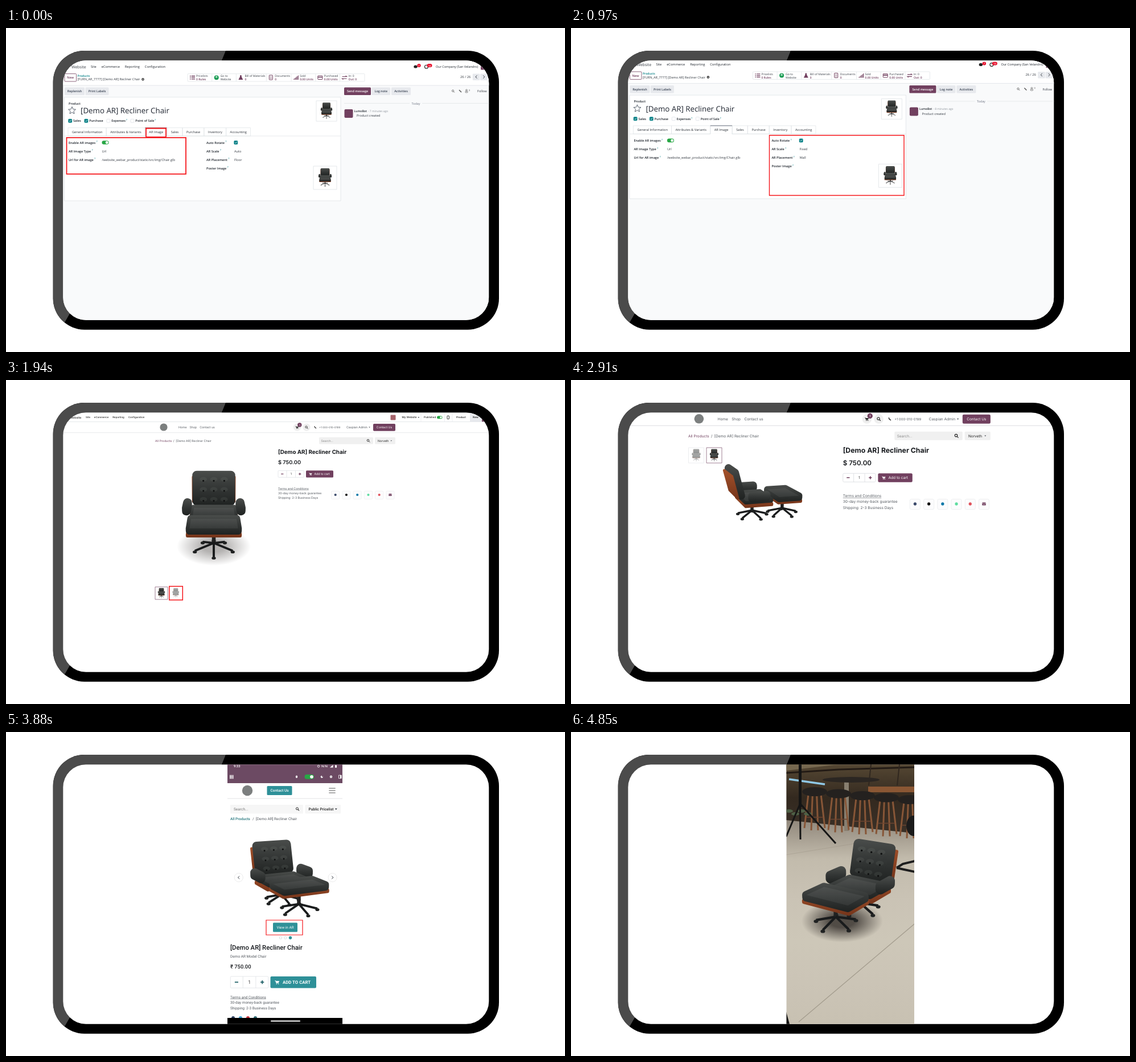
These frames come from a looping animation (982 px wide and 570 px high, 5820 ms). An HTML page with a canvas:

```html
<!DOCTYPE html>
<html lang="en">
<head>
<meta charset="utf-8">
<title>AR product tour</title>
<style>
html, body { margin: 0; width: 982px; height: 570px; overflow: hidden; background: #fff; }
canvas { display: block; }
</style>
</head>
<body>
<canvas id="stage" width="982" height="570"></canvas>
<script>
const g = document.getElementById('stage').getContext('2d');
const SLIDE_MS = 970;
const PLUM = '#71405f', TEAL = '#2e9098', LINK = '#017e84', RED = '#f5161b', INK = '#353b43';
const DARK = '#1f252d', TEXT = '#555a60', GREY = '#e7e9ed', EDGE = '#dfe2e6';
const PRODUCT = '[Demo AR] Recliner Chair';
let face = 'Inter';

// Drawing helpers; say() returns where the text ends
function say(text, x, y, size, color = INK, weight = 400, align = 'left') {
  g.font = `${weight} ${size}px "${face}", sans-serif`;
  g.textRendering = 'geometricPrecision';
  g.textAlign = align;
  g.fillStyle = color;
  g.fillText(text, x, y);
  return x + g.measureText(text).width;
}
function row(words, x, y, gap, ...style) {
  for (const word of words) x = say(word, x, y, ...style) + gap;
}
function box(x, y, w, h, fill, r = 0, stroke, width = .7) {
  g.beginPath();
  g.roundRect(x, y, w, h, r);
  if (fill) { g.fillStyle = fill; g.fill(); }
  if (stroke) { g.strokeStyle = stroke; g.lineWidth = width; g.stroke(); }
}
function disc(x, y, rx, fill, ry = rx) {
  g.beginPath();
  g.ellipse(x, y, rx, ry, 0, 0, 7);
  g.fillStyle = fill;
  g.fill();
}
const ring = (x, y, r, color, width) => box(x - r, y - r, 2 * r, 2 * r, null, r, color, width);
function trace(p) {
  g.beginPath();
  for (let i = 0; i < p.length; i += 2) g.lineTo(p[i], p[i + 1]);
}
function line(color, width, ...p) {
  trace(p);
  g.strokeStyle = color;
  g.lineWidth = width;
  g.stroke();
}
function poly(fill, ...p) {
  trace(p);
  g.fillStyle = fill;
  g.fill();
}
function shade(y0, y1, ...colors) {
  const s = g.createLinearGradient(0, y0, 0, y1);
  colors.forEach((c, i) => s.addColorStop(i / (colors.length - 1), c));
  return s;
}

// Icons
const caret = (x, y, s = 1.4) => poly(INK, x - s, y - s / 2, x + s, y - s / 2, x, y + s * .7);
const chevron = (x, y, d, s = 2.6) => line(INK, 1, x - d * s / 2, y - s, x + d * s / 2, y, x - d * s / 2, y + s);
function lens(x, y, color = '#222', s = 1) {
  ring(x - .5 * s, y - .5 * s, 1.8 * s, color, .9 * s);
  line(color, s, x + .9 * s, y + .9 * s, x + 2.7 * s, y + 2.7 * s);
}
function cart(x, y, color, s = 1) {
  line(color, .8 * s, x - 3 * s, y - 2 * s, x - 2 * s, y - 2 * s, x - s, y + s, x + 2 * s, y + s);
  poly(color, x - 2 * s, y - 1.7 * s, x + 3 * s, y - 1.7 * s, x + 2 * s, y + .4 * s, x - s, y + .4 * s);
  for (const d of [-.7, 1.8]) disc(x + d * s, y + 2.2 * s, .6 * s, color);
}
function quantity(x, y, w, h, color, size) {
  const s = w * .046, cy = y + h / 2;
  box(x, y, w, h, '#fff', 1.5, '#dcdfe3');
  for (const d of [-1, 1]) {
    const cx = x + w * (.5 + d * .34);
    line('#dcdfe3', .7, x + w * (.5 + d * .17), y, x + w * (.5 + d * .17), y + h);
    line(color, s * .6, cx - s, cy, cx + s, cy);
    if (d > 0) line(color, s * .6, cx, cy - s, cx, cy + s);
  }
  say('1', x + w / 2, cy + size * .36, size, '#333', 400, 'center');
}
function toggle(x, y, w, h) {
  box(x, y, w, h, '#28a745', h / 2);
  disc(x + w - h / 2, y + h / 2, h * .36, '#fff');
}
function check(x, y, on) {
  box(x, y, 6, 6, on ? LINK : '#fff', 1, on ? LINK : '#d8dce2');
  if (on) line('#fff', .9, x + 1.4, y + 3.1, x + 2.6, y + 4.3, x + 4.7, y + 1.8);
}
const redFrame = (x, y, w, h, width) => box(x, y, w, h, null, 0, RED, width);

// The chair: one model of cushions in centimetres, seen from any side
const LEATHER = ['#4a4d4b', '#333635', '#1f2221'], WOOD = ['#a5522b', '#74341a'];
const part = (at, size, round, tones = LEATHER, lean = 0) => ({ at, size, round, tones, lean });
const PARTS = [
  part([0, 54, -33], [60, 36, 3], 2, WOOD, .25),
  part([0, 57, -27], [58, 46, 10], 6, LEATHER, .25),
  part([0, 26, 2], [64, 6, 44], 2, WOOD),
  part([0, 32, 2], [62, 9, 46], 4),
  part([-35, 40, 1], [12, 16, 34], 6),
  part([35, 40, 1], [12, 16, 34], 6),
  part([0, 28, 50], [65, 6, 40], 2, WOOD),
  part([0, 34, 50], [66, 13, 42], 5)
];
function hull(points) {
  const half = list => {
    const h = [];
    for (const p of list) {
      while (h.length > 1) {
        const [a, b] = h.slice(-2);
        if ((b[0] - a[0]) * (p[1] - a[1]) > (b[1] - a[1]) * (p[0] - a[0])) break;
        h.pop();
      }
      h.push(p);
    }
    return h.slice(0, -1);
  };
  const sorted = [...points].sort((a, b) => a[0] - b[0] || a[1] - b[1]);
  return [...half(sorted), ...half(sorted.reverse())];
}
function chair({ x, y, s, yaw = 0, pitch = .4, shadow = 0 }) {
  const ca = Math.cos(yaw), sa = Math.sin(yaw), cp = Math.cos(pitch), sp = Math.sin(pitch);
  const project = (px, py, pz) => {
    const side = px * ca + pz * sa, near = pz * ca - px * sa;
    const depth = near * cp + py * sp, k = s * 500 / (500 - depth);
    return [x + k * side, y - k * (py * cp - near * sp), depth];
  };
  const flat = p => p.flatMap(q => q.slice(0, 2));
  if (shadow) {
    const [cx, cy] = project(0, 0, 38);
    g.save();
    g.translate(cx, cy);
    g.scale(s * 50, s * 26);
    const soft = g.createRadialGradient(0, 0, .3, 0, 0, 1);
    soft.addColorStop(0, `rgba(40,35,32,${shadow})`);
    soft.addColorStop(1, 'rgba(40,35,32,0)');
    disc(0, 0, 1, soft);
    g.restore();
  }
  for (const z of [0, 50]) {
    line('#222', 5 * s, ...flat([project(0, 28, z), project(0, 9, z)]));
    for (let i = 0; i < 5; i++) {
      const a = Math.PI * (.5 + i * .4);
      const tip = project(24 * Math.cos(a), 3, z + 24 * Math.sin(a));
      line('#191b1c', 3 * s, ...flat([project(0, 10, z), tip]));
      disc(tip[0], tip[1] + 1.5 * s, 2.8 * s, '#202222', 2 * s);
    }
  }
  const depth = p => project(...p.at)[2];
  for (const p of [...PARTS].sort((a, b) => depth(a) - depth(b))) {
    const [w, h, d] = p.size.map(v => Math.max(0, v / 2 - p.round));
    const point = (u, v, n) => project(p.at[0] + u, p.at[1] + v, p.at[2] + n - p.lean * v);
    const face4 = v => [point(-w, v, -d), point(w, v, -d), point(w, v, d), point(-w, v, d)];
    const outline = hull([...face4(h), ...face4(-h)]), ys = outline.map(q => q[1]);
    const pad = p.round * s;
    trace(flat(outline));
    g.closePath();
    g.lineJoin = 'round';
    g.lineWidth = pad * 2;
    g.fillStyle = g.strokeStyle = shade(Math.min(...ys) - pad, Math.max(...ys) + pad, ...p.tones);
    g.fill();
    g.stroke();
    g.lineJoin = 'miter';
    if (p.tones === WOOD) continue;
    poly('rgba(255,255,255,.06)', ...flat(face4(h)));
    if (p.lean && ca > 0) {
      for (let i = 0; i < 9; i++) {
        const [tx, ty] = point((i % 3 - 1) * 14, 11 - (i / 3 | 0) * 13, 5);
        disc(tx, ty - 2 * s, 5 * s, 'rgba(140,145,142,.12)', 3 * s);
        disc(tx, ty, 1.2 * s, '#0e0f0f');
      }
    }
  }
}
function thumb(x, y, w, border, faded) {
  const s = w * .0066;
  box(x, y, w, w, '#fff', 0, border, .8);
  chair({ x: x + w / 2, y: y + w / 2 + 24 * s, s });
  if (faded) box(x + 1, y + 1, w - 2, w - 2, 'rgba(255,255,255,.5)');
}

// Back office form
const STATS = [
  ['Pricelists', '0 Rules', x => {
    for (const y of [84.5, 87.2, 89.9]) {
      line(PLUM, 1.3, x, y, x + 1.6, y);
      line(PLUM, 1.3, x + 2.8, y, x + 9, y);
    }
  }],
  ['Go to', 'Website', x => {
    disc(x + 4, 87.2, 4, '#1d9c55');
    disc(x + 4, 86, 1.8, '#a9dcbf');
  }],
  ['Bill of Materials', '0', x => {
    poly(PLUM, x + 4, 83, x + 8, 91, x, 91);
    box(x + 2.8, 83, 2.4, 4, PLUM);
  }],
  ['Documents', '0', x => {
    box(x + 1, 83, 6, 8, null, .5, PLUM, 1);
    for (const y of [86, 88.5]) line(PLUM, .8, x + 2.5, y, x + 5.5, y);
  }],
  ['Sold', '0.00 Units', x => {
    for (let i = 0; i < 5; i++) box(x + i * 1.9, 89.5 - i * 1.5, 1.2, 1.5 + i * 1.5, PLUM);
  }],
  ['Purchased', '0.00 Units', x => {
    box(x, 84, 8, 6.5, null, .6, PLUM, 1);
    line(PLUM, 1.6, x, 86.5, x + 8, 86.5);
  }],
  ['In: 0', 'Out: 0', x => {
    line(PLUM, 1.1, x, 85.5, x + 8, 85.5, x + 6, 84);
    line(PLUM, 1.1, x + 8, 89, x, 89, x + 2, 90.5);
  }]
];
function statButtons() {
  box(319, 80.5, 311, 13.5, '#fff', 1, EDGE);
  let x = 319;
  for (const [top, bottom, icon] of STATS) {
    if (x > 319) line(EDGE, .7, x, 80.5, x, 94);
    icon(x + 4);
    const end = say(top, x + 15, 86.4, 5), link = bottom === 'Website';
    say(bottom, x + 15, 92.3, 5, link ? INK : PLUM, link ? 400 : 600);
    x = Math.max(x + 42.7, end + 2);
  }
}
const hint = (x, y) => say('?', x, y - 2.3, 4, LINK, 600);
function fields(x, valueX, rows) {
  rows.forEach(([label, value], i) => {
    const y = 203.6 + i * 15;
    hint(say(label, x, y, 5.55, DARK, 600) + 1.5, y);
    if (value) say(value, valueX, y, 5.7);
  });
}
function star(x, y, r) {
  const p = [];
  for (let i = 0; i <= 10; i++) {
    const a = i * Math.PI / 5, d = i % 2 ? r * .45 : r;
    p.push(x + d * Math.sin(a), y - d * Math.cos(a));
  }
  line('#4b5563', .9, ...p);
}
function button(label, x, w, fill = GREY, color = '#374151') {
  box(x, 104.5, w, 13.5, fill, 1.5);
  say(label, x + w / 2, 113.2, 5.4, color, 600, 'center');
}
function badge(label, x, w) {
  box(x - w / 2, 63, w, 6, '#e8112d', 3);
  say(label, x, 67.5, 4, '#fff', 600, 'center');
}
function formHeader() {
  box(90, 50, 770, 50.5, '#fff');
  line(EDGE, .8, 90, 101, 860, 101);
  say('Website', 115, 70.5, 6.9);
  row(['Site', 'eCommerce', 'Reporting', 'Configuration'], 149, 70, 9, 5.7, DARK);
  disc(719.5, 68, 3.2, '#222', 2.6);
  ring(738.5, 68.2, 3, '#222', 1.1);
  badge('7', 725.5, 6.4);
  badge('14', 744, 9);
  say('Our Company (San Velandro)', 755, 70, 5.5, DARK);
  box(834, 65.5, 10, 8, PLUM, 1);

  box(103, 80.5, 20.5, 13.5, '#fff', 1, PLUM, .8);
  say('New', 107, 89.2, 5.6, PLUM, 600);
  say('Products', 125.5, 85.9, 5.1, LINK, 600);
  say('[FURN_AR_7777] ' + PRODUCT, 125.5, 92.2, 5.6);
  ring(240.5, 90.2, 1.6, '#222', 1.3);
  statButtons();
  say('26 / 26', 798, 88, 5.8);
  for (const d of [-1, 1]) {
    box(826.5 + d * 6.7, 80.5, 12.5, 11.5, GREY, 1);
    chevron(832.8 + d * 6.7, 86, d);
  }
  button('Replenish', 103, 35);
  button('Print Labels', 139.5, 41);
  button('Send message', 594, 47, PLUM, '#fff');
  button('Log note', 642.5, 32.5);
  button('Activities', 677, 34);
  lens(785.5, 111, '#555', .9);
  line('#555', 1.4, 796, 109, 800, 113);
  ring(809, 109.4, 1.4, '#555', .7);
  box(806.8, 111.3, 4.4, 2.4, null, 1, '#555');
  say('0', 813, 110.5, 4, '#555');
  say('Follow', 828, 113.2, 5.6);
}
function formTabs() {
  const names = ['General Information', 'Attributes & Variants', 'AR Image', 'Sales', 'Purchase', 'Inventory', 'Accounting'];
  line(EDGE, .7, 103, 190, 588, 190);
  let x = 109;
  for (const name of names) {
    const end = say(name, x + 7, 184.9, 5.65, '#2b3138') + 6.7, active = name === 'AR Image';
    box(x, 175.5, end - x, 14.5, null, 0, EDGE);
    if (active) {
      line('#fff', 1.4, x + .5, 190, end - .5, 190);
      line('#6b7280', 1, x, 175.5, end, 175.5);
    }
    x = end;
  }
}
function form({ dx, dy, minutes, scale, placement }) {
  face = 'Open Sans';
  box(100, 57, 748, 457, '#f9fafb');
  g.save();
  g.translate(dx, dy);
  formHeader();
  box(102.5, 121.7, 485.5, 182.3, '#fff', 0, EDGE, .8);
  say('Product', 110, 134.5, 5.5, DARK, 600);
  star(116, 145.3, 6.8);
  say(PRODUCT, 131, 150.3, 13.3, '#1f2530');
  let x = 109.7;
  ['Sales', 'Purchase', 'Expenses', 'Point of Sale'].forEach((s, i) => {
    check(x, 160.3, i < 2);
    x = say(s, x + 8.3, 165.4, 5.5, DARK, 600);
    x = (i < 2 ? x : hint(x + 1, 165.4)) + 6.3;
  });
  thumb(545, 128, 36, EDGE);
  formTabs();
  fields(110, 168.5, [['Enable AR images'], ['AR Image Type', 'Url'],
    ['Url for AR image', '/website_webar_product/static/src/img/Chair.glb']]);
  fields(352, 401, [['Auto Rotate'], ['AR Scale', scale], ['AR Placement', placement], ['Poster Image']]);
  toggle(168.5, 198.2, 12, 6.6);
  check(400.8, 198.5, true);
  thumb(540, 243, 41, EDGE);

  line(EDGE, .7, 594, 132.5, 860, 132.5);
  box(709, 130, 22, 5, '#f9fafb');
  say('Today', 720, 134.6, 5.4, '#6b7280', 400, 'center');
  box(594.5, 143, 15, 15, PLUM, 2);
  say('LumoBot', 611.5, 148, 5.1, DARK, 600);
  say(`- ${minutes} minutes ago`, 636, 148, 4.9, '#8a9099');
  say('Product created', 616, 156.2, 5.6);
  g.restore();
}

// Web shop
function editorBar() {
  face = 'Inter';
  line(EDGE, .8, 100, 73.5, 848, 73.5);
  say('Website', 112, 67.9, 5.3, '#333', 500);
  row(['Site', 'eCommerce', 'Reporting', 'Configuration'], 140, 67.4, 6.9, 4.4, '#222', 500);
  box(675.5, 61.5, 9, 9, '#a5636a', 1);
  caret(say('My Website', 695.5, 67.4, 4.6, '#222', 500) + 3.5, 65.8);
  say('Published', 734, 67.4, 4.5, '#222', 500);
  toggle(757, 63.2, 9.5, 5);
  box(775, 63, 3.4, 5.6, null, .6, '#222', .9);
  for (const x of [729, 770.5, 784]) line(GREY, .7, x, 58, x, 73);
  box(815, 57, 21, 16.3, GREY);
  say('Product', 791, 67.4, 4.4, '#222', 600);
  say('New', 820, 67.4, 4.5, '#222', 600);
  box(836, 57, 12, 16.3, PLUM);
}
function terms(x, y, size, gap) {
  const end = say('Terms and Conditions', x, y, size, TEXT);
  line(TEXT, size * .08, x, y + size * .17, end, y + size * .17);
  say('30-day money-back guarantee', x, y + gap, size, TEXT);
  say('Shipping: 2-3 Business Days', x, y + gap * 2, size, TEXT);
}
function shop() {
  face = 'Inter';
  line('#e3e4e7', .8, 0, 92.6, 982, 92.6);
  disc(277, 83, 6.6, '#7c7f7f');
  row(['Home', 'Shop', 'Contact us'], 303, 84.9, 5, 5.2, TEXT);
  for (const x of [511.5, 528]) disc(x, 83.2, 6.6, '#efefef');
  cart(511.3, 83.5, '#222', .9);
  lens(528, 83.2, '#222', .95);
  disc(515.8, 79, 3.7, PLUM);
  say('1', 515.8, 80.5, 4, '#fff', 600, 'center');
  line('#333', 1.2, 542, 81.2, 542.6, 83.3, 545, 85);
  say('+1 000-010-0199', 550, 84.9, 4.6, TEXT);
  say('Caspian Admin', 598, 84.9, 5.2, TEXT);
  caret(638.5, 83.2, 1.3);
  box(645, 77, 39, 12.7, PLUM, 1.8);
  say('Contact Us', 664.5, 84.9, 5.2, '#fff', 400, 'center');

  say('All Products', 262, 108.6, 5.15, PLUM);
  say('/', 293.8, 108.6, 5.2, TEXT);
  say(PRODUCT, 298.3, 108.6, 5.2, TEXT);
  box(550, 100.8, 95, 12, '#f0f0f0', 1.5);
  box(648, 100.8, 36, 12, '#f0f0f0', 1.5);
  say('Search...', 553.5, 108.6, 5.1, '#888');
  lens(636.5, 106.8);
  say('Norveth', 653, 108.6, 5.1, '#222');
  caret(676.8, 106.8, 1.2);

  say(PRODUCT, 478, 130.4, 9.75, '#16191d', 700);
  say('$ 750.00', 478, 148, 9.25, '#16191d', 600);
  quantity(478, 159.3, 45.5, 12, PLUM, 5.2);
  box(527, 159.2, 48, 12.4, PLUM, 1.6);
  cart(535, 165.5, '#fff', .85);
  say('Add to cart', 541.5, 167.3, 5.2, '#fff');
  terms(478, 192.8, 5.2, 8);
  ['#3b4a6b', '#111', '#0b78a8', '#5fdda0', '#e0525c', PLUM].forEach((color, i) => {
    const x = 578.7 + i * 19.25;
    box(x - 7.2, 195.3, 14.4, 14.4, '#fcfcfd', 2, '#eceef0');
    if (i < 5) return disc(x, 202, 2.1, color);
    box(x - 2.6, 200, 5.2, 4, color, .5);
    line('#fff', .5, x - 2.6, 200.8, x, 202.6, x + 2.6, 200.8);
  });
}
function shopFront() {
  editorBar();
  shop();
  chair({ x: 365, y: 272, s: 1.3, shadow: .35 });
  thumb(262, 364, 22, '#8a6079');
  thumb(288, 364.5, 20.5, '#fff', true);
  redFrame(286.8, 363, 23.5, 24, 1.5);
}
function shopSide() {
  const zoom = 1.258;
  g.save();
  g.translate(206, 68.3);
  g.scale(zoom, zoom);
  g.translate(-262, -83);
  shop();
  g.restore();
  thumb(206.5, 119, 27, GREY, true);
  thumb(238, 119, 27, '#8a6079');
  chair({ x: 318, y: 240, s: 1.12, yaw: 1.85, pitch: .3 });
}

// Phone screen
function statusBars() {
  const bar = '#6c4a63', white = '#fff';
  box(389, 57, 202, 33, bar);
  say('9:33', 400, 62.4, 5.8, white, 500);
  ring(549, 60.2, 1.8, white, .8);
  for (const x of [555, 561]) line(white, .8, x, 62, x, 58.5, x + 3, 62, x + 3, 58.5);
  poly(white, 569, 62.5, 574.5, 62.5, 574.5, 57.8);
  box(578, 58.2, 3, 4.6, white, .6);
  for (let i = 0; i < 9; i++) box(393 + i % 3 * 2.4, 75.7 + (i / 3 | 0) * 2.4, 1.8, 1.8, white);
  disc(510.5, 78.8, 1.7, white, 2.2);
  toggle(524.5, 74.8, 16.5, 8);
  disc(554.8, 78.8, 2.1, white);
  disc(555.8, 77.9, 1.1, bar);
  ring(571, 78.8, 1.5, white, 1.4);
  box(584.5, 76, 4.6, 5.6, null, 0, white, .8);
  box(587, 76, 2.2, 5.6, white);
}
function phone() {
  face = 'Roboto';
  statusBars();
  line('#e2e3e5', 1, 389, 117, 591, 117);
  disc(424, 103, 9.2, '#7c7f7f');
  box(458.5, 95, 44, 16, TEAL, 1.5);
  say('Contact Us', 480.5, 105.2, 6.5, '#fff', 500, 'center');
  for (const y of [99, 103, 107]) line('#555', 1, 567.3, y, 578.7, y);
  box(394, 128, 128, 15.5, '#f6f6f6', 1);
  box(525.5, 128, 62.5, 15.5, '#f6f6f6', 1);
  say('Search...', 400, 138, 6.5, '#777');
  lens(512, 135.4, '#222', 1.1);
  say('Public Pricelist', 531.5, 138, 6.55, '#222', 500);
  caret(579.8, 135.6, 2);
  say('All Products', 394, 154.9, 6.4, '#23757c', 500);
  say('/', 433, 154.9, 6.4, TEXT);
  say(PRODUCT, 439, 154.9, 6.5, TEXT);

  chair({ x: 484, y: 298, s: 1.27, yaw: .45, pitch: .29 });
  for (const d of [-1, 1]) {
    const x = 491.2 + d * 82.4;
    disc(x, 256, 7.6, '#fff');
    ring(x, 256, 7.6, '#e6e6e6', .8);
    chevron(x, 256, d);
  }
  box(469, 335.5, 43, 16.3, TEAL, 1.5);
  say('View in AR', 490.5, 345.8, 6.4, '#fff', 400, 'center');
  redFrame(457, 331, 64, 26, 1.2);
  for (const x of [480.5, 488.8]) box(x, 360, 4, 4, '#fff', .8, '#c9d3d5');
  disc(499.5, 362, 2.7, TEAL);

  say(PRODUCT, 394, 382.8, 11.3, '#16191d', 500);
  say('Demo AR Model Chair', 394, 396.8, 6.5, TEXT);
  say('₹ 750.00', 394, 416, 9.4, '#16191d', 500);
  quantity(394.3, 430, 66.5, 20.3, '#23636a', 8.5);
  box(464.5, 430, 80.5, 20.5, TEAL, 2);
  cart(476.3, 440.3, '#fff', 1.3);
  say('ADD TO CART', 486, 443, 7.8, '#fff', 700);
  terms(394, 468.6, 6.45, 9.8);
  ['#2c3f5f', '#3b9fd0', '#c8323c', '#2c6a72'].forEach((color, i) => disc(399 + i * 13, 503, 3, color));
  box(389, 503, 202, 12, '#000');
  box(465, 507.6, 52, 1.8, '#fff', 1);
}

// Room view
function stool(x, y) {
  for (let i = -1.5; i < 2; i++) line('#875637', 3, x + i * 7, y, x + i * 12, y + 70 - Math.abs(i) * 4);
  line('#6d4531', 1.6, x - 15, y + 45, x + 15, y + 45);
  disc(x, y, 22, '#24211f', 8);
}
function room() {
  g.save();
  g.beginPath();
  g.rect(378.5, 57, 224.5, 457);
  g.clip();
  box(378, 57, 226, 457, shade(150, 514, '#8d8478', '#c2bbac', '#cac3b5', '#cdc7b8', '#cbc4b6', '#c8c1b2'));
  poly(shade(57, 175, '#554733', '#33291f', '#3a3027'), 378, 57, 604, 57, 604, 178, 378, 155);
  poly('#76684f', 378, 57, 470, 57, 378, 68);
  line('#231b15', 3, 378, 72, 470, 66, 604, 62);
  line('#8fc8e6', 3.5, 383, 83, 446, 92);
  for (const x of [527, 577]) line('#30271f', 2, x, 57, x - 4, 94);
  box(480, 84, 8, 90, '#887f70');
  disc(492, 84, 50, '#2b2622', 5);
  box(522, 96, 82, 10, '#8a5734');
  for (let i = 4; i >= 0; i--) stool(428 + i * 42, 105 + i * 3.5);
  for (let i = 0; i < 4; i++) disc(383 + i * 11, 139 + i % 2 * 5, 7, '#4e6046', 3);
  line('#151515', 5, 402.5, 57, 402.5, 132);
  for (const [x, y] of [[378, 184], [403, 189], [465, 196]]) line('#151515', 3, 402.5, 126, x, y);
  disc(602, 165, 13, '#1b1b1b', 18);
  for (const y of [227, 246]) line('#1d1d1d', 4, 572, 239, 583, (y + 237) / 2, 604, y);
  line('rgba(130,122,108,.55)', 1.2, 400, 510, 604, 337);
  line('rgba(140,130,118,.3)', 1, 378, 216, 500, 196);
  poly('#111', 378, 492, 384, 514, 378, 514);
  chair({ x: 508, y: 314, s: 1.43, yaw: -.58, pitch: .4, shadow: .75 });
  g.restore();
}

const slides = [
  () => {
    form({ dx: 0, dy: 0, minutes: 7, scale: 'Auto', placement: 'Floor' });
    redFrame(246, 176.5, 35, 15.5, 1.8);
    redFrame(106.5, 192.8, 209.5, 64, 1.8);
  },
  () => {
    form({ dx: .4, dy: -3.6, minutes: 8, scale: 'Fixed', placement: 'Wall' });
    redFrame(348.5, 188.7, 236.5, 105.8, 1.4);
  },
  shopFront, shopSide, phone, room
];

function draw(now) {
  box(0, 0, 982, 570, '#fff');
  g.save();
  box(82.7, 40, 783.3, 490.7, '#000', 55);
  g.clip();
  poly('#4b4b4b', 0, 0, 386, 40, 379, 57, 114, 499, 103, 518, 0, 570);
  g.restore();
  g.save();
  box(100.3, 57.3, 748, 456.5, '#fff', 40);
  g.clip();
  slides[Math.floor(now / SLIDE_MS) % slides.length]();
  g.restore();
}
function tick() {
  draw(performance.now());
  requestAnimationFrame(tick);
}
tick();
</script>
</body>
</html>
```
